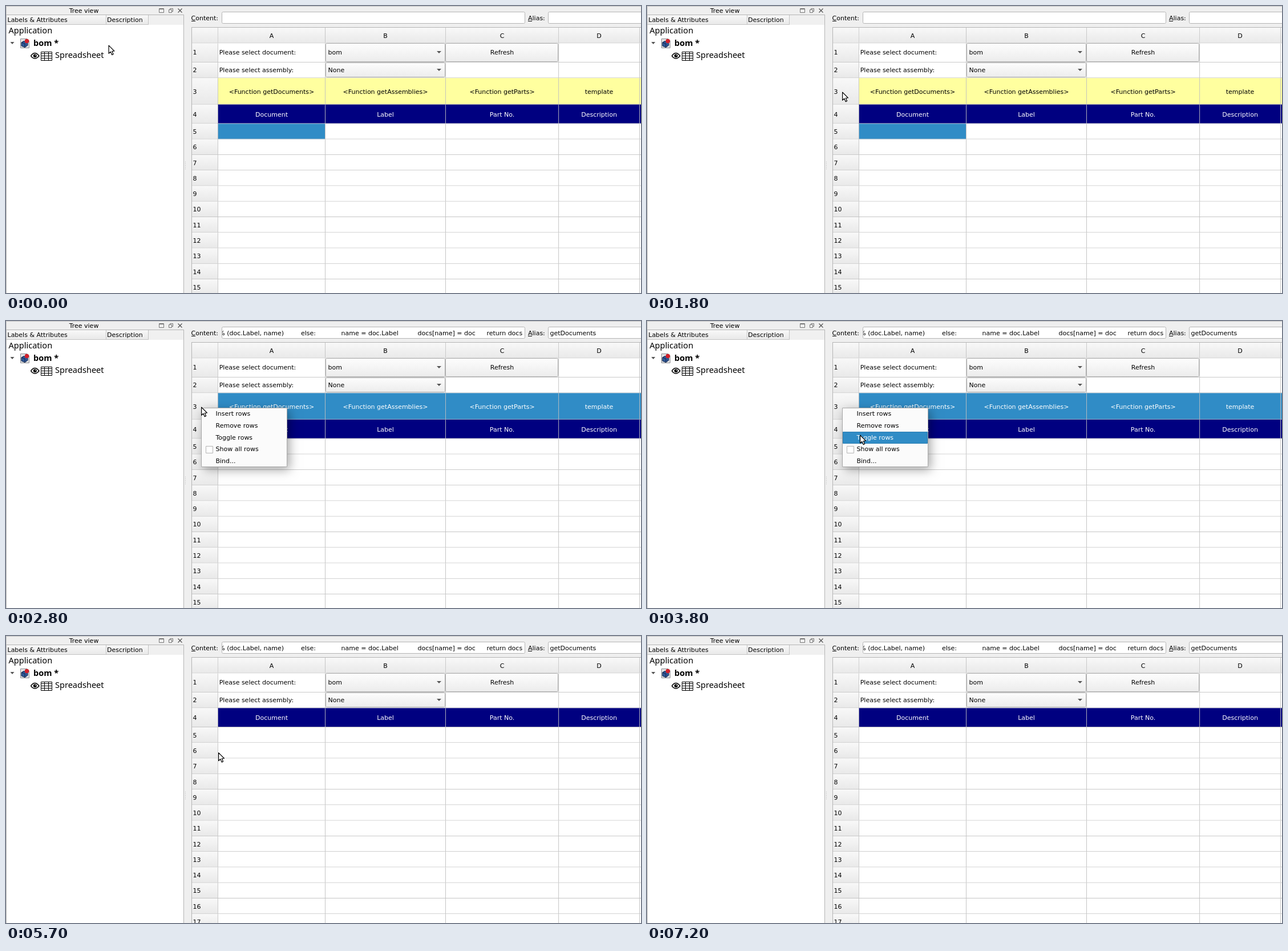
Write an HTML page with a canvas that moves like this. It is 1113 px wide and 503 px high and loops after 8000 ms.

```html
<!DOCTYPE html>
<html lang="en">
<head>
<meta charset="utf-8">
<title>Spreadsheet rows</title>
<style>
html, body { margin: 0; width: 100%; height: 100%; overflow: hidden; background: #efefef; }
canvas { display: block; }
</style>
</head>
<body>
<canvas id="stage" width="1113" height="503"></canvas>
<script>
const W = 1113, H = 503, LOOP = 8000;
const PX = 1 / 1.1; // the sheet is laid out in units slightly smaller than a pixel
const ctx = document.getElementById('stage').getContext('2d');

const UI = '11px "DejaVu Sans", sans-serif';
const TREE = '14.55px "Noto Sans", sans-serif';
const BG = '#efefef', GRID = '#c0c0c0', EDGE = '#b4b4b4';
const BLUE = '#308cc6', NAVY = '#000080', YELLOW = '#ffff9f';

const cols = [408, 615, 847, 1065, 1221, 1400].map(x => x * PX);
const rowHeight = { 1: 37, 2: 30, 3: 51, 4: 37 };
const functions = ['<Function getDocuments>', '<Function getAssemblies>', '<Function getParts>', 'template'];
const titles = ['Document', 'Label', 'Part No.', 'Description'];
const menuItems = ['Insert rows', 'Remove rows', 'Toggle rows', 'Show all rows', 'Bind...'];
const menu = { x: 342, y: 152, w: 151, h: 104, pitch: 20.8 };

// Pointer moves: curves sampled every 100 ms
const moves = [
  { at: 1100, steps: 1, to: [449, 231] },
  { at: 1300, steps: 6, via: [277, 152], to: [342, 151] },
  { at: 3300, steps: 2, to: [371, 188] },
  { at: 3800, steps: 1, to: [373, 200] },
  { at: 5000, steps: 2, to: [363.5, 206] },
  { at: 5400, steps: 4, via: [377, 208], to: [372, 204.5] },
  { at: 6300, steps: 9, via: [595, 150], to: [81, 19] }
];

function pointerAt(t) {
  let pos = [179.5, 69];
  for (const { at, steps, to, via = to } of moves) {
    if (t < at) break;
    const u = Math.min(1, (Math.floor((t - at) / 100) + 1) / steps), v = 1 - u;
    pos = pos.map((p, i) => v * v * p + 2 * u * v * via[i] + u * u * to[i]);
  }
  return pos;
}

function box(x, y, w, h, color) {
  ctx.fillStyle = color;
  ctx.fillRect(x, y, w, h);
}

function text(s, x, y, color = '#000', font = UI, align = 'left') {
  ctx.font = font;
  ctx.textAlign = align;
  ctx.fillStyle = color;
  ctx.fillText(s, x, y);
}

function path(points, fill, stroke, width = 1, close = true) {
  ctx.beginPath();
  points.forEach(([x, y]) => ctx.lineTo(x, y));
  if (close) ctx.closePath();
  if (fill) { ctx.fillStyle = fill; ctx.fill(); }
  if (stroke) { ctx.strokeStyle = stroke; ctx.lineWidth = width; ctx.stroke(); }
}

function disc(x, y, r, color) {
  ctx.beginPath();
  ctx.arc(x, y, r, 0, 2 * Math.PI);
  ctx.fillStyle = color;
  ctx.fill();
}

function frame(x, y, w, h, fill, stroke, r = 0) {
  ctx.beginPath();
  ctx.roundRect(x + 0.5, y + 0.5, w - 1, h - 1, r);
  if (fill) { ctx.fillStyle = fill; ctx.fill(); }
  ctx.strokeStyle = stroke;
  ctx.lineWidth = 1;
  ctx.stroke();
}

function shade(y, h, top, bottom) {
  const g = ctx.createLinearGradient(0, y, 0, y + h);
  g.addColorStop(0, top);
  g.addColorStop(1, bottom);
  return g;
}

// Shaded cell with its lines just past the right and bottom edges
function headerCell(x, y, right, bottom) {
  box(x, y, right - x, bottom - y, shade(y, bottom - y, '#f8f8f8', '#e9e9e9'));
  box(right, y, PX, bottom - y, GRID);
  box(x, bottom, right - x + PX, PX, GRID);
}

function button(x, y, right, bottom) {
  [x, y, right, bottom] = [x, y, right, bottom].map(Math.round);
  frame(x, y, right - x, bottom - y, shade(y, bottom - y, '#fdfdfd', '#ececec'), '#adadad', 2);
}

function combo(label, y, bottom, base) {
  button(cols[1] + PX, y, cols[2], bottom);
  text(label, 564.5, base);
  path([[755, base - 6], [763, base - 6], [759, base - 2]], '#555');
}

function drawIcons() {
  // dock buttons
  frame(268, 4, 9, 8, null, '#777');
  box(268, 5, 9, 1, '#777');
  frame(287, 4, 6, 6, null, '#777');
  frame(285, 6, 6, 6, BG, '#777');
  path([[301.5, 4.5], [308.5, 11.5]], null, '#555', 1.2, false);
  path([[308.5, 4.5], [301.5, 11.5]], null, '#555', 1.2, false);

  path([[7.5, 63], [14.5, 63], [11, 67]], '#555');

  // document
  path([[25.5, 57.5], [37, 57.5], [40.5, 61], [40.5, 73.5], [25.5, 73.5]], '#e4e4e6', '#8a8a8e');
  path([[27, 64], [31, 61.5], [38, 63.5], [38, 69], [33, 72.5], [27, 70]], '#2f5796', '#12284e');
  path([[27, 64], [33, 66], [33, 72.5]], null, '#12284e', 1, false);
  disc(36.5, 61.5, 3.7, '#d3202a');

  // eye
  ctx.beginPath();
  ctx.moveTo(43.5, 87.5);
  ctx.quadraticCurveTo(50.5, 77.5, 58, 87.5);
  ctx.quadraticCurveTo(50.5, 96.5, 43.5, 87.5);
  ctx.strokeStyle = '#000';
  ctx.lineWidth = 1.5;
  ctx.stroke();
  disc(50.8, 87.2, 3, '#000');
  disc(51.7, 86.2, 0.8, '#fff');

  // table
  frame(61, 80, 20, 16, '#fff', '#000');
  for (const y of [83, 87, 91]) box(61, y, 20, 1, '#000');
  for (const x of [67, 74]) box(x, 80, 1, 16, '#000');
}

function drawTree() {
  box(0, 15, 312, H, EDGE);
  box(1, 16, 310, H, '#fff');
  box(1, 16, 310, 17, '#f0f0f0');
  headerCell(1, 16, 175, 32);
  headerCell(176, 16, 249, 32);
  text('Tree view', 136.5, 12, '#000', UI, 'center');
  text('Labels & Attributes', 2.5, 28);
  text('Description', 177, 28);
  text('Application', 4.5, 48, '#000', TREE);
  text('bom *', 48, 70, '#000', 'bold ' + TREE);
  text('Spreadsheet', 86, 91, '#000', TREE);
  drawIcons();
  for (let y = 273; y < 288; y += 3) box(314, y, 1, 1, '#b5b5b5');
}

function drawFields(filled) {
  const base = 25;
  for (const [label, x, field, w] of [['Content:', 324.5, 378, 532], ['Alias:', 915, 950, 240]]) {
    text(label, x, base);
    box(Math.round(x), base + 1, 7, 1, '#000');
    frame(field, 10, w, 21, '#fff', EDGE, 2);
  }
  if (!filled) return;
  ctx.save();
  ctx.beginPath();
  ctx.rect(379, 11, 529, 19);
  ctx.clip();
  text('% (doc.Label, name)', 487, base, '#000', UI, 'right');
  text('else:', 517, base);
  text('name = doc.Label', 587.5, base);
  text('docs[name] = doc', 721.5, base);
  text('return docs', 842.5, base);
  ctx.restore();
  text('getDocuments', 953.5, base);
}

function centered(list, base, color) {
  list.forEach((s, i) => text(s, (cols[i] + cols[i + 1] + PX) / 2, base, color, UI, 'center'));
}

function drawRow(n, y, bottom, selected) {
  const top = y + PX, h = bottom - y;
  // rows holding widgets set their text a little higher
  const base = Math.round(y + h / 2 + (n < 3 ? 4 : 5));
  const fill = n === 3 ? (selected ? BLUE : YELLOW) : n === 4 ? NAVY : '#fff';

  box(cols[0], top, W, h, fill);
  if (n === 5 && !selected) box(cols[0], top, cols[1] - cols[0], h, BLUE);
  box(cols[0], bottom, W, PX, GRID);
  for (const x of cols.slice(1, 5)) box(x, top, PX, h, GRID);
  headerCell(326, top, cols[0], bottom);
  text(n, 327.5, base);

  if (n === 1) {
    text('Please select document:', 373.7, base);
    combo('bom', top, bottom, base);
    button(cols[2], top, cols[3], bottom);
    centered(['', '', 'Refresh'], base, '#000');
  }
  if (n === 2) {
    text('Please select assembly:', 373.7, base);
    combo('None', top, bottom, base);
  }
  if (n === 3) centered(functions, base, selected ? '#fff' : '#000');
  if (n === 4) centered(titles, base, '#fff');
}

function drawSheet(selected, hidden) {
  let y = 71 * PX;
  box(325, 37, W, H, EDGE);
  box(326, 38, W, H, '#fff');
  headerCell(326, 38, cols[0], y);
  for (let i = 0; i < 5; i++) headerCell(cols[i] + PX, 38, cols[i + 1], y);
  centered([...'ABCD'], 56, '#000');
  for (let n = 1; y < H; n++) {
    if (n === 3 && hidden) continue;
    const bottom = y + (rowHeight[n] || 30) * PX;
    drawRow(n, y, bottom, selected);
    y = bottom;
  }
}

function drawMenu(pointerY) {
  const { x, y, w, h, pitch } = menu;
  const active = Math.floor((pointerY - y) / pitch);
  ctx.save();
  ctx.shadowColor = 'rgba(0,0,0,0.35)';
  ctx.shadowBlur = 17;
  ctx.shadowOffsetX = 4;
  ctx.shadowOffsetY = 5;
  box(x, y, w, h, '#fbfbfb');
  ctx.restore();
  frame(x, y, w, h, '#fbfbfb', '#a8a8a8');
  menuItems.forEach((s, i) => {
    const top = y + Math.round(i * pitch), on = i === active;
    if (on) frame(x + 1, top, w - 2, 21, BLUE, '#2b7eb2');
    text(s, 367.5, top + 14, on ? '#fff' : '#000');
  });
  frame(350, 219, 13, 13, '#fff', EDGE);
}

function drawPointer([x, y]) {
  ctx.save();
  ctx.translate(x + 0.6, y + 0.2);
  ctx.lineJoin = 'round';
  path([[0, 0], [0, 14], [3.2, 11], [5.6, 16.4], [8, 15.3], [5.7, 10.1], [9.8, 9.8]], '#fff', '#000', 1.2);
  ctx.restore();
}

function draw(t) {
  const selected = t >= 2200, hidden = t >= 4200;
  const pos = pointerAt(t);
  box(0, 0, W, H, BG);
  box(0, 0, W, 1, '#c4c4c4');
  box(0, 0, 1, H, '#c4c4c4');
  drawTree();
  drawFields(selected);
  drawSheet(selected, hidden);
  if (t >= 2800 && !hidden) drawMenu(pos[1]);
  if (t < 7200) drawPointer(pos);
}

const start = performance.now();
function tick() {
  draw((performance.now() - start) % LOOP);
  requestAnimationFrame(tick);
}
tick();
</script>
</body>
</html>
```
